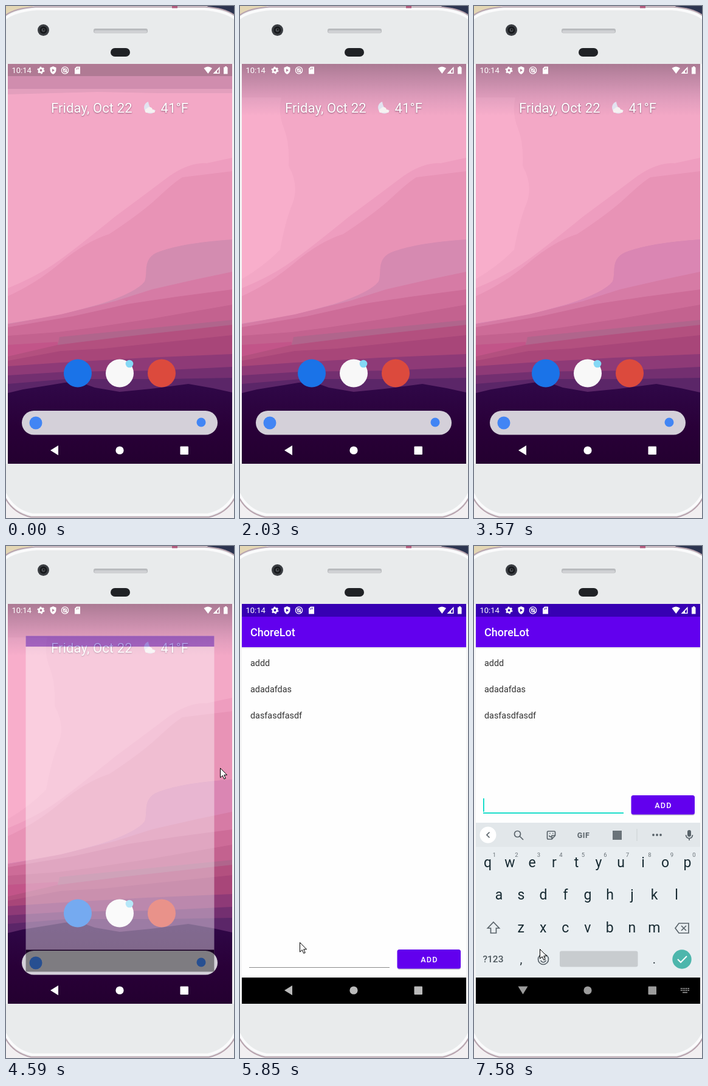
An HTML page that plays this animation: 375x840 px, repeating every 8 s.

```html
<!DOCTYPE html>
<html lang="en">
<head>
<meta charset="utf-8">
<title>Phone app launch</title>
<style>
html, body { margin: 0; width: 100%; height: 100%; overflow: hidden; background: #e9ebec; }
svg { display: block; width: 375px; height: 840px; font-family: Roboto, sans-serif; }
.mid { text-anchor: middle; }
.line { fill: none; stroke: #59636a; stroke-width: 1.7; }
.date { font-size: 22px; letter-spacing: .12px; fill: #fff; filter: drop-shadow(0 1px 1px rgba(70, 30, 60, .55)); }
.item { font-size: 14.4px; fill: #333; }
</style>
</head>
<body>
<svg viewBox="0 0 375 840">
<defs>
  <clipPath id="screen"><rect x="3" y="95" width="369" height="656"/></clipPath>
  <clipPath id="imeArea"><rect x="3" y="454" width="369" height="254"/></clipPath>
  <linearGradient id="shade" x2="0" y2="1">
    <stop offset="0" stop-color="#4c3c50" stop-opacity=".43"/>
    <stop offset=".4" stop-color="#5c4a68" stop-opacity=".27"/>
    <stop offset=".7" stop-color="#6c5a80" stop-opacity=".13"/>
    <stop offset="1" stop-color="#6c5a80" stop-opacity="0"/>
  </linearGradient>
  <linearGradient id="hill" x2="0" y2="1">
    <stop offset="0" stop-color="#300849"/>
    <stop offset=".55" stop-color="#290038"/>
    <stop offset="1" stop-color="#240030"/>
  </linearGradient>
</defs>

<!-- phone body -->
<rect width="375" height="840" fill="#f2eff1"/>
<path d="M0 0H45L0 16Z" fill="#e3d6b4"/>
<path d="M330 0H375V16Z" fill="#2c3450"/>
<path d="M-3 17Q12 4 48 1.5H328Q363 4 378 17V803Q366 831 334 838.5H41Q9 831-3 803Z" fill="#e9ebec" stroke="#b8a3ae" stroke-width="2"/>
<path d="M-2 21Q14 8 50 5H326Q361 8 377 21M-2 799Q12 828 43 834.5H332Q363 828 377 799" fill="none" stroke="#fbfbfc" stroke-width="4"/>
<rect x="273" width="9" height="3.5" fill="#b0597c"/>
<circle cx="61.5" cy="39.5" r="9.5" fill="#3a3d42"/>
<circle cx="61.5" cy="39.5" r="6" fill="#17191c"/>
<circle cx="61.5" cy="39.5" r="3" fill="#4a4e54"/>
<circle cx="62" cy="39" r="1.4" fill="#111"/>
<rect x="144" y="37" width="89" height="7.5" rx="3" fill="#b9bbbe"/>
<rect x="145" y="40" width="87" height="4" rx="2" fill="#d0d1d4"/>
<rect x="172" y="69" width="32" height="14" rx="7" fill="#202226"/>
<rect x="0" y="95" width="375" height="656" fill="#f5f5f6"/>

<g clip-path="url(#screen)">
  <g id="home">
    <rect x="3" y="95" width="369" height="656" fill="#f3a8c6"/>
    <path id="glow" d="M3 150H68Q62 175 72 200T80 262Q98 295 86 325T66 400Q38 428 3 448Z" fill="#f8aecb"/>
    <g id="layers"></g>
    <rect id="shadeBox" x="3" y="95" width="369" height="85" fill="url(#shade)"/>
    <g id="bands">
      <rect x="3" y="95" width="369" height="20" fill="#b07a94"/>
      <rect x="3" y="115" width="369" height="21" fill="#d08dae"/>
      <path d="M3 136H372V143H250L150 141 3 145Z" fill="#e39fbd"/>
    </g>
    <text class="date" x="74" y="175">Friday, Oct 22</text>
    <text class="date" x="254.5" y="175">41°F</text>
    <path d="M234 157A10 10 0 1 0 246 171Q236 171 234 157Z" fill="#e2e3f0"/>
    <path d="M230 175a4 4 0 0 1 2-7 5 5 0 0 1 9 2 3 3 0 0 1 3 5z" fill="#f6f2f2"/>
    <circle cx="118" cy="602.5" r="23" fill="#1a73e8"/>
    <circle cx="187" cy="602.5" r="23" fill="#f8f8f8"/>
    <circle cx="203" cy="587" r="6.3" fill="#84d8f5"/>
    <circle cx="256" cy="602.5" r="23" fill="#dc4a3d"/>
    <rect x="26" y="664" width="322" height="39.5" rx="19.75" fill="#d4d0d9"/>
    <circle cx="49" cy="684" r="10.5" fill="#4285f4"/>
    <circle cx="321" cy="683" r="7.5" fill="#4285f4"/>
  </g>

  <g id="win">
    <rect x="3" y="95" width="369" height="656" fill="#fefefe"/>
    <rect x="3" y="95" width="369" height="21" fill="#3700b3"/>
    <g id="app">
      <rect x="3" y="166" width="369" height="2" fill="#d9d5e2" opacity=".6"/>
      <rect x="3" y="116" width="369" height="50" fill="#6200ee"/>
      <text x="17" y="148" font-size="18" font-weight="500" fill="#fff">ChoreLot</text>
      <text class="item" x="17" y="197">addd</text>
      <text class="item" x="17" y="240">adadafdas</text>
      <text class="item" x="17" y="283">dasfasdfasdf</text>
      <g id="entry">
        <rect id="rule" x="15" width="231"/>
        <rect id="caret" x="15" y="667" width="1.8" height="22" fill="#03dac5"/>
        <rect x="259" y="664" width="104" height="31" rx="3.5" fill="#000" opacity=".2"/>
        <rect x="258.5" y="662" width="104.5" height="31.5" rx="3.5" fill="#6200ee"/>
        <text class="mid" x="311.4" y="682.5" font-size="12.6" font-weight="500" letter-spacing="1.1" fill="#fff">ADD</text>
      </g>
    </g>
    <g clip-path="url(#imeArea)"><g id="ime">
      <rect x="3" y="454" width="369" height="254" fill="#e9eef1"/>
      <rect x="3" y="454" width="369" height="39.5" fill="#e2e7ea"/>
      <circle cx="23" cy="474" r="13.5" fill="#fff"/>
      <path class="line" d="M25.5 469.5L21 474L25.5 478.5"/>
      <g class="line">
        <circle cx="71.5" cy="472.5" r="5"/><path d="M75 476L81 482"/>
        <path d="M122 468H132Q133.5 468 133.5 470V475L128 481H122Q120.5 481 120.5 479V470Q120.5 468 122 468ZM133 475H128V481M123.5 475Q125 478 128 477"/>
        <path d="M124 471.5h1.5M129 471.5h1.5"/>
      </g>
      <text class="mid" x="180" y="478.5" font-size="12.5" font-weight="700" letter-spacing=".5" fill="#59636a">GIF</text>
      <rect x="228" y="467" width="15" height="15" fill="#6a7379"/>
      <path d="M268 464V484" stroke="#cbd0d3"/>
      <g fill="#59636a">
        <circle cx="295" cy="474" r="1.9"/><circle cx="301" cy="474" r="1.9"/><circle cx="307" cy="474" r="1.9"/>
        <rect x="351" y="466" width="6" height="11" rx="3"/>
      </g>
      <path class="line" d="M348.5 474Q349 479.5 354 479.5T359.5 474M354 479.5V483"/>
      <g id="keys"></g>
      <path class="line" d="M32 617L41.5 627H36.5V635H27.5V627H22.5Z"/>
      <path class="line" d="M331 627L337 619H353V635H337ZM341 623L349 631M349 623L341 631"/>
      <text class="mid" x="31.5" y="683" font-size="15.5" font-weight="500" fill="#4c565c">?123</text>
      <text class="mid" x="77.5" y="685" font-size="20" fill="#263238">,</text>
      <text class="mid" x="296.5" y="685" font-size="20" fill="#263238">.</text>
      <g class="line"><circle cx="114" cy="678" r="8.5"/><path d="M109.5 680Q114 686 118.5 680M110.5 675h1.5M116 675h1.5"/></g>
      <rect x="141" y="664.5" width="128.5" height="26" rx="3" fill="#c8cccf"/>
      <circle cx="342" cy="678" r="15.7" fill="#4db6ac"/>
      <path d="M335 678L340 683L350 673" fill="none" stroke="#fff" stroke-width="2"/>
    </g></g>
    <rect x="3" y="708" width="369" height="43"/>
  </g>

  <!-- status icons -->
  <g fill="#fff">
    <text x="9.5" y="110" font-size="13">10:14</text>
    <circle cx="57.5" cy="105.5" r="3.3" fill="none" stroke="#fff" stroke-width="2.8"/>
    <circle cx="57.5" cy="105.5" r="5" fill="none" stroke="#fff" stroke-width="2" stroke-dasharray="2.6 2.636"/>
    <path fill-rule="evenodd" d="M77.5 99L82.5 101V105Q82.5 109.5 77.5 112Q72.5 109.5 72.5 105V101ZM76 103V108L80 105.5Z"/>
    <g fill="none" stroke="#fff" stroke-width="1.3"><circle cx="97" cy="105.5" r="5.6"/><circle cx="97" cy="105.5" r="2.6"/><path d="M94 102.5L101 109.5"/></g>
    <path fill-rule="evenodd" d="M116 99.5H122V111.5H113V102.5ZM115.5 102V104.5H116.5V102ZM118 101V104H119V101Z"/>
    <path d="M325.5 102Q332 97 339 102L332.3 111Z"/>
    <path fill-rule="evenodd" d="M351.5 99.5V111H340.5ZM350 103.5L347 106.7V109.5H350Z"/>
    <path d="M358 100.5H360V99H363V100.5H364.5V111.5H358Z"/>
  </g>

  <g id="nav" fill="#fff">
    <path id="back" d="M73 729L86 721V737Z"/>
    <path id="down" d="M72.5 722.5H88.5L80.5 735.5Z"/>
    <circle cx="187" cy="729" r="6.6"/>
    <rect x="286.5" y="722.5" width="13.5" height="13.5" rx="1"/>
    <g id="switcher">
      <path d="M340 726H354M340 729H354" stroke="#fff" stroke-width="1.8" stroke-dasharray="1.8 1.2"/>
      <path d="M343 732.5H351" stroke="#fff" stroke-width="1.6"/>
    </g>
  </g>
</g>

<path id="cursor" d="M.5.5V16L4.2 12.6L6.8 18.3L9.2 17.2L6.7 11.7H11.5Z" fill="#fff" stroke="#000"/>
</svg>
<script>
const $ = id => document.getElementById(id);
const LOOP = 8000;

// Wallpaper: each layer is its colour and upper edge, filled to the bottom.
const layers = [
  ['#ee9dbf', 'M3 463Q45 446 75 426T180 345Q225 312 262 284T330 258L372 249'],
  ['#e893b6', 'M3 476Q50 455 90 421T170 374Q222 340 250 314T290 281L372 271'],
  ['#d38cb0', 'M3 521L85 508L155 489Q214 470 228 452C234 437 224 417 247 405Q285 389 372 383', 'lilac'],
  ['#d67ba5', 'M3 522L90 506L180 484L240 465L310 449L372 436'],
  ['#cd6c98', 'M3 527L110 509L200 489L280 477L372 465'],
  ['#c3628f', 'M3 541L85 535L140 528L240 513L372 490'],
  ['#b0658c', 'M86 552L88 543L190 533L372 515'],
  ['#c25589', 'M3 556L85 551V575L3 580Z'],
  ['#b3507f', 'M3 575L85 556L190 543L372 523'],
  ['#a84679', 'M3 582L90 566L160 562L372 540'],
  ['#8e3a77', 'M3 591L90 585L230 577L372 571'],
  ['#732f70', 'M3 606L100 600L250 598L372 592'],
  ['#5b2668', 'M3 620L100 612L260 612L372 610'],
  ['url(#hill)', 'M3 635L28 629L72 622L96 618L118 616L146 626L187 633L238 628L300 620L340 627L372 634']
];
$('layers').innerHTML = layers.map(([fill, edge, id]) => {
  const d = edge.endsWith('Z') ? edge : edge + 'V751H3Z';
  return `<path d="${d}" fill="${fill}"/>` + (id ? `<path id="${id}" d="${d}" fill="#da86b3"/>` : '');
}).join('');

const rows = [['qwertyuiop', 22.5, 527], ['asdfghjkl', 41, 580], ['zxcvbnm', 77.3, 634]];
$('keys').innerHTML = rows.map(([chars, x0, y], row) => [...chars].map((c, i) => {
  const x = x0 + i * 36.5;
  const hint = row ? '' : `<text class="mid" x="${x + 11}" y="510" font-size="9.5" fill="#687177">${(i + 1) % 10}</text>`;
  return `<text class="mid" x="${x}" y="${y}" font-size="23" fill="#172a32">${c}</text>${hint}`;
}).join('')).join('');

// Step tables: time, then values held until the next row.
const settle = [[0, 0], [680, .15], [810, .3], [950, .5], [1070, .7], [1220, .85], [1370, 1]];
const lilac = [[0, 0], [1790, .2], [2030, .3], [2870, .5], [3000, .7], [3150, .85], [3420, 1]];
const grow = [[0, .84, 0], [4590, .84, .4], [4740, .9, .72], [4890, .965, .94], [5010, 1, 1]];
const content = [[0, 0], [5610, .45], [5730, .85], [5850, 1]];
const navDim = [[0, 1], [5460, .9], [5610, .82], [5730, .77], [5850, .73], [5970, .68], [6090, .61]];
const slide = [[0, 254], [6660, 130], [6780, 30], [6930, 0]];
const caret = [[0, 0], [6660, 1], [7180, 0], [7580, 1]];
const pointer = [
  [0, -50, -50], [4320, 328, 360], [4440, 347, 358], [4590, 352, 364], [4740, 338, 384],
  [4890, 302, 419], [5010, 275, 439], [5160, 273, 439], [5310, 175, 487], [5460, 112, 598],
  [5610, 98, 650], [5970, 100, 660], [6090, 101, 666], [6240, 118, 679], [6360, 110, 673],
  [6510, 108, 668], [6660, 108, 661]
];

const at = (table, t) => table.findLast(row => row[0] <= t).slice(1);
const fade = (id, v) => $(id).setAttribute('opacity', v);
const move = (id, x, y) => $(id).setAttribute('transform', `translate(${x} ${y})`);

function draw(t) {
  const [clear] = at(settle, t);
  fade('glow', clear);
  fade('shadeBox', clear);
  fade('bands', 1 - clear);
  fade('lilac', at(lilac, t)[0]);

  const [scale, alpha] = at(grow, t);
  $('win').setAttribute('transform', `translate(187.5 423) scale(${scale}) translate(-187.5 -423)`);
  fade('win', alpha);
  fade('app', at(content, t)[0]);
  fade('nav', at(navDim, t)[0]);

  const focused = t >= 6510, typing = t >= 6660;
  move('entry', 0, typing ? -253 : 0);
  $('rule').setAttribute('y', focused ? 690.2 : 691);
  $('rule').setAttribute('height', focused ? 1.8 : 1);
  $('rule').setAttribute('fill', focused ? '#03dac5' : '#8a8a8a');
  fade('caret', at(caret, t)[0]);
  move('ime', 0, at(slide, t)[0]);
  fade('back', +!typing);
  fade('down', +typing);
  fade('switcher', +typing);
  move('cursor', ...at(pointer, t));
}

const start = performance.now();
function tick() {
  draw((performance.now() - start) % LOOP);
  requestAnimationFrame(tick);
}
tick();
</script>
</body>
</html>
```
